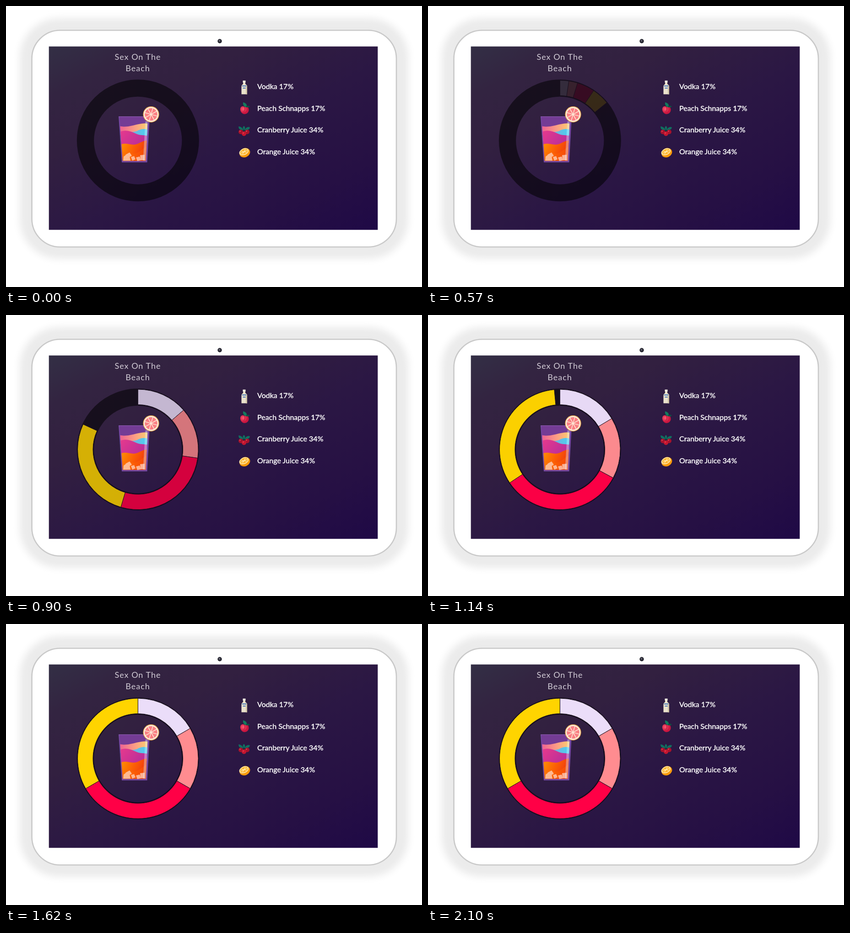
Write an HTML page that moves like this. It is 909 by 616 pixels and loops after 2130 ms.

```html
<!DOCTYPE html>
<html lang="en">
<head>
<meta charset="utf-8">
<title>Cocktail recipe</title>
<style>
  html, body { margin: 0; width: 100%; height: 100%; overflow: hidden; background: #fff; }
  svg { display: block; width: 909px; height: 616px; }
  text { font-family: Lato, "Open Sans", sans-serif; }
  .title { font-size: 18px; letter-spacing: 1px; fill: #d2ccd6; text-anchor: middle; }
  .item { font-size: 16px; fill: #fff; stroke: #fff; stroke-width: .4px; }
</style>
</head>
<body>
<svg viewBox="0 0 909 616">
  <defs>
    <filter id="soft" x="-10%" y="-15%" width="120%" height="130%"><feGaussianBlur stdDeviation="8"/></filter>
    <linearGradient id="screen" x1="0" y1="0" x2="1" y2="1">
      <stop offset="0" stop-color="#332f45"/>
      <stop offset=".14" stop-color="#332441"/>
      <stop offset=".3" stop-color="#322040"/>
      <stop offset=".55" stop-color="#2b1744"/>
      <stop offset=".8" stop-color="#261044"/>
      <stop offset="1" stop-color="#1f0946"/>
    </linearGradient>
    <linearGradient id="peachWave">
      <stop offset="0" stop-color="#ee5f93"/><stop offset=".5" stop-color="#fb9a86"/><stop offset="1" stop-color="#fdd36b"/>
    </linearGradient>
    <linearGradient id="blueWave">
      <stop offset="0" stop-color="#a65bb5"/><stop offset=".5" stop-color="#6fb4e0"/><stop offset="1" stop-color="#45d3f3"/>
    </linearGradient>
    <linearGradient id="pinkWave" x2="1" y2=".5">
      <stop offset="0" stop-color="#e83a8c"/><stop offset="1" stop-color="#b52d9c"/>
    </linearGradient>
    <linearGradient id="orangeWave" x2="1" y2=".3">
      <stop offset="0" stop-color="#ff9a00"/><stop offset=".55" stop-color="#fb5f05"/><stop offset="1" stop-color="#ee3510"/>
    </linearGradient>
    <radialGradient id="fruit" cx=".35" cy=".35">
      <stop offset="0" stop-color="#ff5c72"/><stop offset="1" stop-color="#c9163f"/>
    </radialGradient>
    <clipPath id="drink"><path d="M248 243H310L305.5 339.5H255Z"/></clipPath>
  </defs>

  <rect x="30" y="27" width="849" height="527" rx="86" fill="#ebebeb" filter="url(#soft)"/>
  <rect x="56.5" y="53.3" width="796.5" height="475" rx="62" fill="#fff" stroke="#c9c9c9" stroke-width="2.6"/>
  <circle cx="467" cy="77" r="4.7" fill="#25252f"/>
  <circle cx="466.5" cy="76.3" r="2" fill="#62626f"/>
  <rect x="93.7" y="88.7" width="718.6" height="402" fill="url(#screen)"/>

  <text class="title" x="288" y="117.5">Sex On The</text>
  <text class="title" x="288" y="143">Beach</text>

  <circle cx="288.3" cy="294.8" r="114.8" fill="none" stroke="#000" stroke-opacity=".55" stroke-width="37.4"/>
  <g id="ring" transform="translate(288.3 294.8)" stroke="#1a1020" stroke-width="1"></g>

  <g id="glass">
    <path d="M246 242H314L308.5 342.8H253Z" fill="#754aa5"/>
    <path d="M248 243H311L309 266H249.5Z" fill="#743c95"/>
    <g clip-path="url(#drink)">
      <path d="M247 263C264 267 275 262 290 259Q302 256 312 258V300H247Z" fill="url(#peachWave)"/>
      <path d="M247 276C264 271 276 281 290 272Q301 267 312 272V300H247Z" fill="url(#blueWave)"/>
      <path d="M247 277C260 270 271 274 282 279C294 285 301 282 312 285V312H247Z" fill="url(#pinkWave)"/>
      <path d="M247 306C258 298 267 304 279 304S298 293 312 295V342H247Z" fill="url(#orangeWave)"/>
      <path d="M247 320C266 317 275 330 290 320S303 309 312 307V342H247Z" fill="#ff6a00" opacity=".35"/>
    </g>
    <g fill="#ffd9c9" opacity=".72">
      <path d="M257 330L264 325L270 329L272 339H256Z"/>
      <path d="M261 326L270 321L275 328L267 333Z"/>
      <path d="M273 331L280 329L283 336L276 339Z"/>
      <path d="M284 332L292 330L295 338L287 340Z"/>
      <path d="M293 327L303 326L303 338L294 338Z"/>
    </g>
    <path d="M304.5 253H309.5L305.5 339H299.5Z" fill="#dff0ff" opacity=".38"/>
    <path d="M246.5 242.5H313.5" stroke="#9260b8" stroke-width="1.2"/>
  </g>
  <g id="citrus" transform="translate(317 237.6)">
    <circle r="17.6" fill="#e9a34a"/>
    <circle r="16.3" fill="#fdebd8"/>
    <circle r="13.7" fill="#fa7f83"/>
  </g>

  <g id="bottle">
    <path d="M518 164H523V171Q527 173 527 177V193.5H514.5V177Q514.5 173 518 171Z" fill="#ebe2cc"/>
    <path d="M524 173Q527 174 527 177V193.5H524Z" fill="#cfc3a5"/>
    <rect x="517.5" y="163.5" width="6" height="4" fill="#f8f3e6"/>
    <rect x="516" y="174.3" width="9" height="2" fill="#376cb8"/>
    <rect x="517.5" y="179" width="6" height="1.8" fill="#376cb8"/>
  </g>
  <g id="peach">
    <path d="M521 221C515 217 511 223 512 228C513 234 518 237 521 237C526 237 531 233 530.5 227C530 220 525 218 521 221Z" fill="url(#fruit)"/>
    <path d="M521 221Q524 227 519 232" fill="none" stroke="#a80f36" stroke-width="1"/>
    <path d="M524 222Q517 219 518 211Q527 213 526 221Z" fill="#127b5c"/>
    <path d="M523 221Q527 217 533 220Q529 224 523 221Z" fill="#0b5545"/>
  </g>
  <g id="berries">
    <path d="M519 272Q508 273 508 264Q515 264 519 272ZM520 272Q515 266 520 263Q525 267 520 272ZM521 272Q526 263 533 266Q532 273 521 272Z" fill="#107060"/>
    <path d="M520 272L513 275M520 272V278M520 272L527 275" stroke="#0a4b40" stroke-width="1.2"/>
    <g fill="#a5122c"><circle cx="513" cy="276" r="5"/><circle cx="527" cy="276" r="5"/></g>
    <circle cx="520" cy="280" r="5" fill="#c4162f"/>
    <g fill="#e84c5c"><circle cx="511.5" cy="274.5" r="1.2"/><circle cx="518.5" cy="278.5" r="1.2"/><circle cx="525.5" cy="274.5" r="1.2"/></g>
  </g>
  <g id="orange" transform="translate(521 320.8) rotate(-24)">
    <ellipse cx=".3" cy="1" rx="12" ry="10" fill="#f99a0b"/>
    <ellipse cx="-.5" cy="-1.6" rx="10.8" ry="7" fill="#fff0bd"/>
    <ellipse cx="-.5" cy="-1.6" rx="9.2" ry="5.5" fill="#ffb52c"/>
    <path d="M-9 -1.6H8M-5.5 -5.2L4.5 2M-5.5 2L4.5 -5.2" stroke="#fff0bd" stroke-width="1.1"/>
  </g>

  <text class="item" x="549" y="182">Vodka 17%</text>
  <text class="item" x="549" y="229.7">Peach Schnapps 17%</text>
  <text class="item" x="549" y="277.3">Cranberry Juice 34%</text>
  <text class="item" x="549" y="325">Orange Juice 34%</text>
</svg>
<script>
  const LOOP = 2130, STEP = 30, START = 83, DURATION = 1335;
  const OUTER = 131.8, INNER = 98.3;
  const parts = [
    { share: 17, color: '#ebddf9' },
    { share: 17, color: '#ff8c90' },
    { share: 34, color: '#ff0046' },
    { share: 34, color: '#ffd400' }
  ];
  const total = parts.reduce((sum, part) => sum + part.share, 0);

  function add(parent, name, attrs) {
    const node = document.createElementNS('http://www.w3.org/2000/svg', name);
    for (const key in attrs) node.setAttribute(key, attrs[key]);
    return parent.appendChild(node);
  }

  // Angles run clockwise from twelve o'clock.
  const point = (r, a) => `${(r * Math.sin(a)).toFixed(2)} ${(-r * Math.cos(a)).toFixed(2)}`;
  const sector = (a, b) =>
    `M${point(OUTER, a)}A${OUTER} ${OUTER} 0 0 1 ${point(OUTER, b)}` +
    `L${point(INNER, b)}A${INNER} ${INNER} 0 0 0 ${point(INNER, a)}Z`;
  const easeInOutQuart = u => u < .5 ? 8 * u ** 4 : 1 - 8 * (1 - u) ** 4;

  const ring = document.getElementById('ring');
  for (const part of parts) part.node = add(ring, 'path', { fill: part.color });

  const citrus = document.getElementById('citrus');
  for (let i = 0; i < 8; i++) {
    const a = (i + .35) * Math.PI / 4;
    add(citrus, 'path', { d: `M0 0L${point(14, a)}`, stroke: '#fdebd8', 'stroke-width': 1.5 });
  }

  function draw(time) {
    const t = Math.floor(time % LOOP / STEP) * STEP;
    const grown = easeInOutQuart(Math.min(1, Math.max(0, (t - START) / DURATION)));
    ring.setAttribute('visibility', grown > 0 ? 'visible' : 'hidden');
    let angle = 0;
    for (const { share, node } of parts) {
      const end = angle + 2 * Math.PI * grown * share / total;
      node.setAttribute('d', sector(angle, end));
      node.setAttribute('opacity', grown);
      angle = end;
    }
  }

  let begin;
  function tick(now) {
    begin ??= now;
    draw(now - begin);
    requestAnimationFrame(tick);
  }
  draw(0);
  requestAnimationFrame(tick);
</script>
</body>
</html>
```
